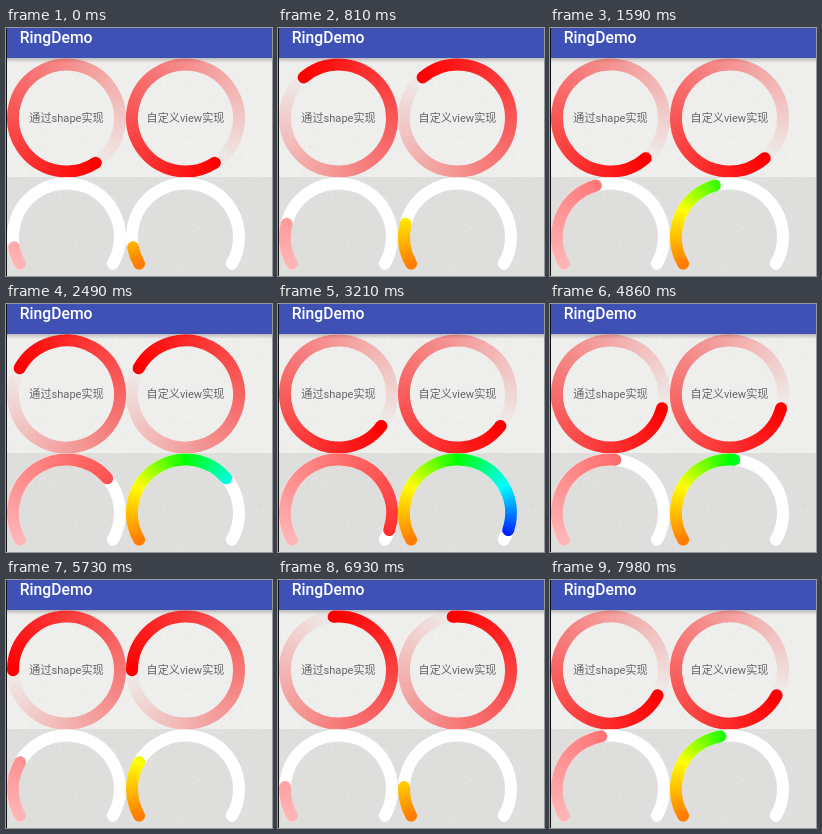
Animation of 266x248 px, one loop 8000 ms. Source, as an HTML page with a canvas:

```html
<!DOCTYPE html>
<html lang="zh">
<head>
<meta charset="utf-8">
<title>RingDemo</title>
<style>
  html, body { margin: 0; width: 100%; height: 100%; overflow: hidden; background: #eee; }
  canvas { display: block; }
</style>
</head>
<body>
<canvas id="stage" width="266" height="248"></canvas>
<script>
const WIDTH = 266, HEIGHT = 248, LOOP = 8000;
const RADIUS = 53.5, THICKNESS = 12;
const COLUMNS = [60.5, 179.5], RING_Y = 90, ARC_Y = 209;
const ARC_START = 150, ARC_SWEEP = 240;

// [time in ms, degrees]: the rings turn anticlockwise, the arcs fill and empty.
const RING_KEYS = [[0, 57], [1590, -311], [2490, -511], [3930, -855], [5730, -1260], [6930, -1535], [8000, -1776]];
const ARC_KEYS = [[0, 19], [235, 0], [1590, 104], [2490, 169.5], [3350, 240], [3930, 195],
                  [5730, 60], [6515, 0], [6930, 32], [8000, 111.5]];

const ctx = document.getElementById('stage').getContext('2d');
const rad = degrees => degrees * Math.PI / 180;

function valueAt(keys, time) {
  const next = Math.max(1, keys.findIndex(key => key[0] > time));
  const [t0, v0] = keys[next - 1], [t1, v1] = keys[next];
  return v0 + (v1 - v0) * (time - t0) / (t1 - t0);
}

function conic(x, y, startDegrees, stops) {
  const gradient = ctx.createConicGradient(rad(startDegrees), x, y);
  stops.forEach(([degrees, color]) => gradient.addColorStop(degrees / 360, color));
  return gradient;
}

function strokeArc(x, y, from, sweep, style, cap = 'round') {
  ctx.beginPath();
  ctx.arc(x, y, RADIUS, rad(from), rad(from + sweep));
  ctx.lineWidth = THICKNESS;
  ctx.lineCap = cap;
  ctx.strokeStyle = style;
  ctx.stroke();
}

function drawRing(x, head) {
  const fade = conic(x, RING_Y, head, [[0, '#f00'], [360, 'rgba(255,0,0,0)']]);
  strokeArc(x, RING_Y, head, 360, fade, 'butt');
  strokeArc(x, RING_Y, head, 0.1, '#f00');
}

// Gradients begin at 90 degrees so that the round caps keep the end colours.
function drawGauge(x, sweep, stops) {
  strokeArc(x, ARC_Y, ARC_START, ARC_SWEEP, '#fff');
  strokeArc(x, ARC_Y, ARC_START, Math.max(sweep, 0.1), conic(x, ARC_Y, 90, stops));
}

const PINK = [[60, '#ffb6b6'], [300, '#ff2a2a']];
const RAINBOW = [[60, '#ff7d00'], [120, '#ff0'], [180, '#0f0'], [240, '#0ff'], [300, '#00f']];

function makePaper() {
  const paper = document.createElement('canvas');
  paper.width = WIDTH;
  paper.height = HEIGHT;
  const p = paper.getContext('2d');
  let seed = 7;
  const random = () => (seed = seed * 16807 % 2147483647) / 2147483647;
  p.fillStyle = '#eeeeec';
  p.fillRect(0, 0, WIDTH, HEIGHT);
  for (let i = 0; i < 1500; i++) {
    const x = random() * WIDTH, y = random() * HEIGHT;
    p.strokeStyle = random() < 0.5 ? 'rgba(255,255,255,.4)' : 'rgba(0,0,0,.025)';
    p.beginPath();
    p.moveTo(x, y);
    p.lineTo(x + random() * 6 - 3, y + random() * 6 - 3);
    p.stroke();
  }
  p.fillStyle = 'rgba(0,0,0,.065)';
  p.fillRect(0, 149, WIDTH, HEIGHT - 149);
  return paper;
}
const paper = makePaper();

function drawToolbar() {
  const shadow = ctx.createLinearGradient(0, 30, 0, 35);
  shadow.addColorStop(0, 'rgba(0,0,0,.22)');
  shadow.addColorStop(1, 'rgba(0,0,0,0)');
  ctx.fillStyle = shadow;
  ctx.fillRect(0, 30, WIDTH, 5);
  ctx.fillStyle = '#3f51b5';
  ctx.fillRect(0, 0, WIDTH, 30);
  ctx.fillStyle = '#fff';
  ctx.font = '500 15.7px Roboto, sans-serif';
  ctx.textAlign = 'left';
  ctx.fillText('RingDemo', 13.8, 14.6);
}

function drawLabels() {
  ctx.fillStyle = '#666';
  ctx.font = '11.1px Roboto, "Noto Sans CJK SC", "Noto Sans CJK", sans-serif';
  ctx.textAlign = 'center';
  ['通过shape实现', '自定义view实现'].forEach((label, i) => ctx.fillText(label, COLUMNS[i], 94));
}

function draw(now) {
  const time = now % LOOP;
  const head = valueAt(RING_KEYS, time), sweep = valueAt(ARC_KEYS, time);
  ctx.drawImage(paper, 0, 0);
  drawToolbar();
  COLUMNS.forEach(x => drawRing(x, head));
  drawGauge(COLUMNS[0], sweep, PINK);
  drawGauge(COLUMNS[1], sweep, RAINBOW);
  drawLabels();
  ctx.fillStyle = '#111';
  ctx.fillRect(0, 0, 1, HEIGHT);
}

const start = performance.now();
function frame() {
  draw(performance.now() - start);
  requestAnimationFrame(frame);
}
frame();
</script>
</body>
</html>
```
